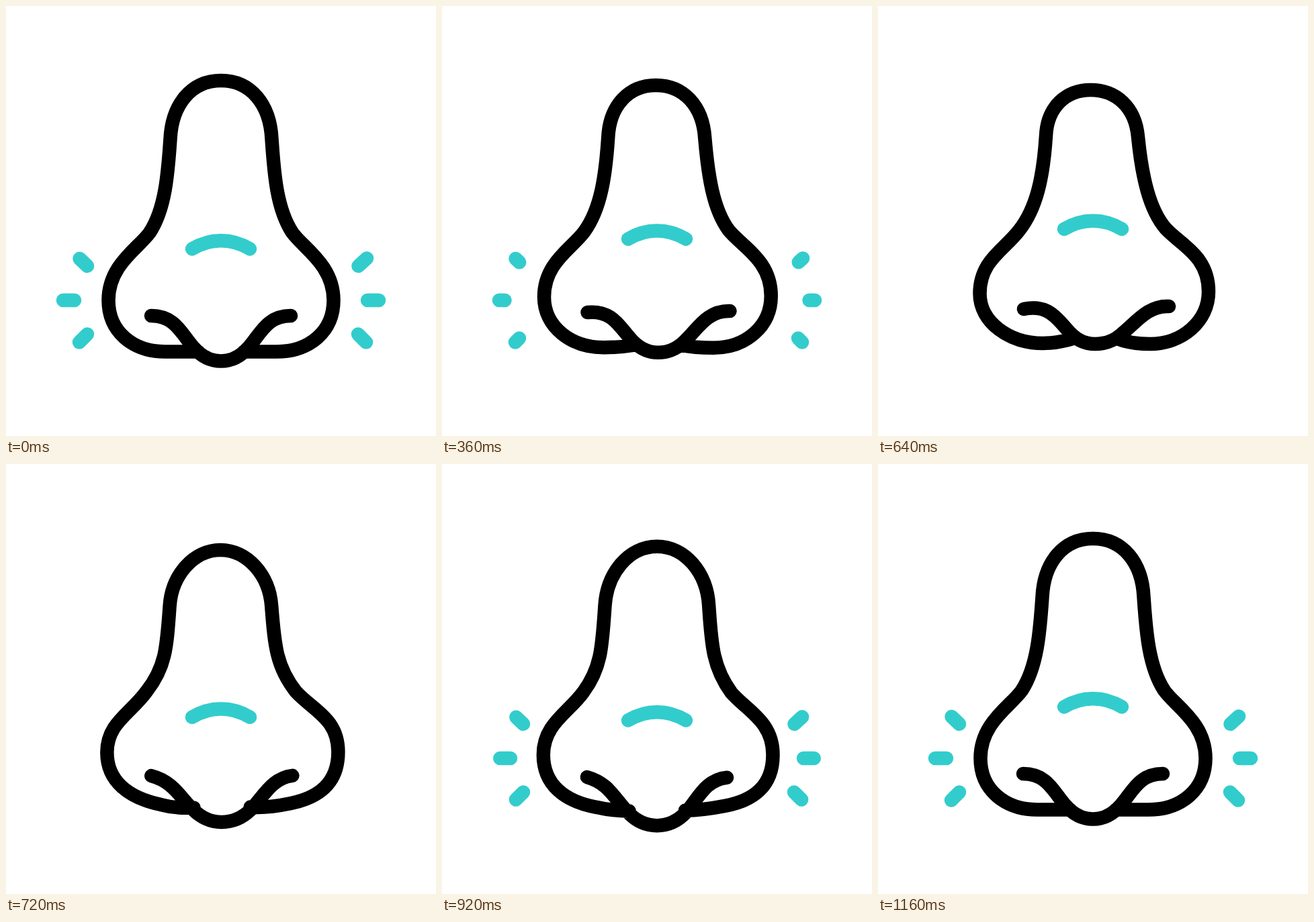
Animation, 640 px wide and 640 px high, one loop 1.48 s. Source, as an HTML page:

```html
<!DOCTYPE html>
<html lang="en">
<head>
<meta charset="utf-8">
<title>Nose</title>
<style>
  html, body { margin: 0; width: 100%; height: 100%; overflow: hidden; background: #fff; }
  svg { display: block; width: 100%; height: 100%; }
  path { fill: none; stroke-width: 20.5; stroke-linecap: round; stroke-linejoin: round; }
  #nose { stroke: #000; }
  #bridge, #rays { stroke: #33cccc; }
</style>
</head>
<body>
<svg viewBox="0 0 640 640">
  <path id="nose"/>
  <path id="bridge" d="M277 361.5C304 345 336 345 363 361.5"/>
  <path id="rays"/>
</svg>
<script>
const LOOP = 1480, STEP = 40;

// Each pose: outline from left nostril over the top to the right, then the nostril curve.
const REST = `M286 514.5 C270 514.5 253 514.5 237 514.5 C188 514.5 152.5 484 152.5 438
  C152.5 385 198 360 214 337 C237 302 241 250 244.5 198 C247 146 276 111 320 111
  C364 111 393 146 395.5 198 C399 250 403 302 426 337 C442 360 487.5 385 487.5 438
  C487.5 484 452 514.5 403 514.5 C387 514.5 370 514.5 354 514.5
  M216 461 C252 461 261 488 279 508 C291 522 305 528.5 320 528.5
  C335 528.5 349 522 361 508 C379 488 388 461 424 461`;
const SNIFF = `M293 494 C278 499 262 502 245 502 C196 502 151.5 471 151.5 428
  C151.5 379 188 363 210 334 C236 301 246 255 250 193 C252 150 280 125 316.5 125
  C354 125 383 150 387 195 C393 255 404 303 428 331 C452 357 492 372 492 425
  C492 470 452 503 405 503 C387 503 371 501 356 495
  M217 451 C252 444 265 463 281 481 C293 495 305 503 323 503
  C340 503 352 498 364 487 C383 472 402 445 433 447`;
const BLOW = `M275 517.5 C258 517 243 515 226 509 C180 496 150 474 150 430
  C150 388 184 375 209 340 C238 303 237 280 241.5 217 C245 170 279 128.5 320 128.5
  C361 128.5 395 170 398 217 C402 275 402 302 433 342 C460 371 495 382 495 430
  C495 478 468 495 430 506 C402 513 386 516 366 516
  M216 468.5 C247 482 255 504 276 524 C289 537 304 543 320 543
  C336 543 351 537 364 524 C382 504 394 474 424 469.5`;

// Outer end, inner end
const RAYS = [
  [109.5, 376, 121, 387], [85, 438, 102, 438], [109, 500.5, 121, 488.5],
  [537, 375.5, 524.5, 387], [555, 438, 538, 438], [536, 500.5, 524, 488.5]
];

const NUM = /-?[\d.]+/g;
const mix = (a, b, k) => a + (b - a) * k;

function ease(t, from, to) {
  const u = Math.min(1, Math.max(0, (t - from) / (to - from)));
  return u * u * (3 - 2 * u);
}

function mixPath(a, b, k) {
  const target = b.match(NUM);
  let i = 0;
  return a.replace(NUM, n => mix(+n, +target[i++], k).toFixed(2));
}

const PEAK = { d: mixPath(REST, BLOW, 1.03), lift: 31 };
const KEYS = [
  { at: 80, d: REST, lift: 0 },
  { at: 640, d: SNIFF, lift: -29.5 },
  { at: 760, ...PEAK },
  { at: 1160, d: REST, lift: 0 }
];

// Rays shrink towards their outer ends, then grow back from the inner ends.
function rayPath(t) {
  const start = t < 680 ? 0 : 1 - ease(t, 720, 960);
  const end = t < 680 ? 1 - ease(t, 80, 640) : 1;
  if (end - start < 0.001) return "";
  return RAYS.map(([x1, y1, x2, y2]) => {
    const at = k => `${mix(x1, x2, k)} ${mix(y1, y2, k)}`;
    return `M${at(start)}L${at(end)}`;
  }).join("");
}

const nose = document.getElementById("nose");
const bridge = document.getElementById("bridge");
const rays = document.getElementById("rays");

function draw(t) {
  const next = Math.max(1, KEYS.findIndex(key => key.at > t));
  const i = t >= 1160 ? KEYS.length - 1 : next;
  const a = KEYS[i - 1], b = KEYS[i];
  const k = ease(t, a.at, b.at);
  nose.setAttribute("d", mixPath(a.d, b.d, k));
  bridge.setAttribute("transform", `translate(0 ${mix(a.lift, b.lift, k)})`);
  rays.setAttribute("d", rayPath(t));
}

const begin = performance.now();
function tick() {
  const t = (performance.now() - begin) % LOOP;
  draw(Math.floor(t / STEP) * STEP);
  requestAnimationFrame(tick);
}
tick();
</script>
</body>
</html>
```
